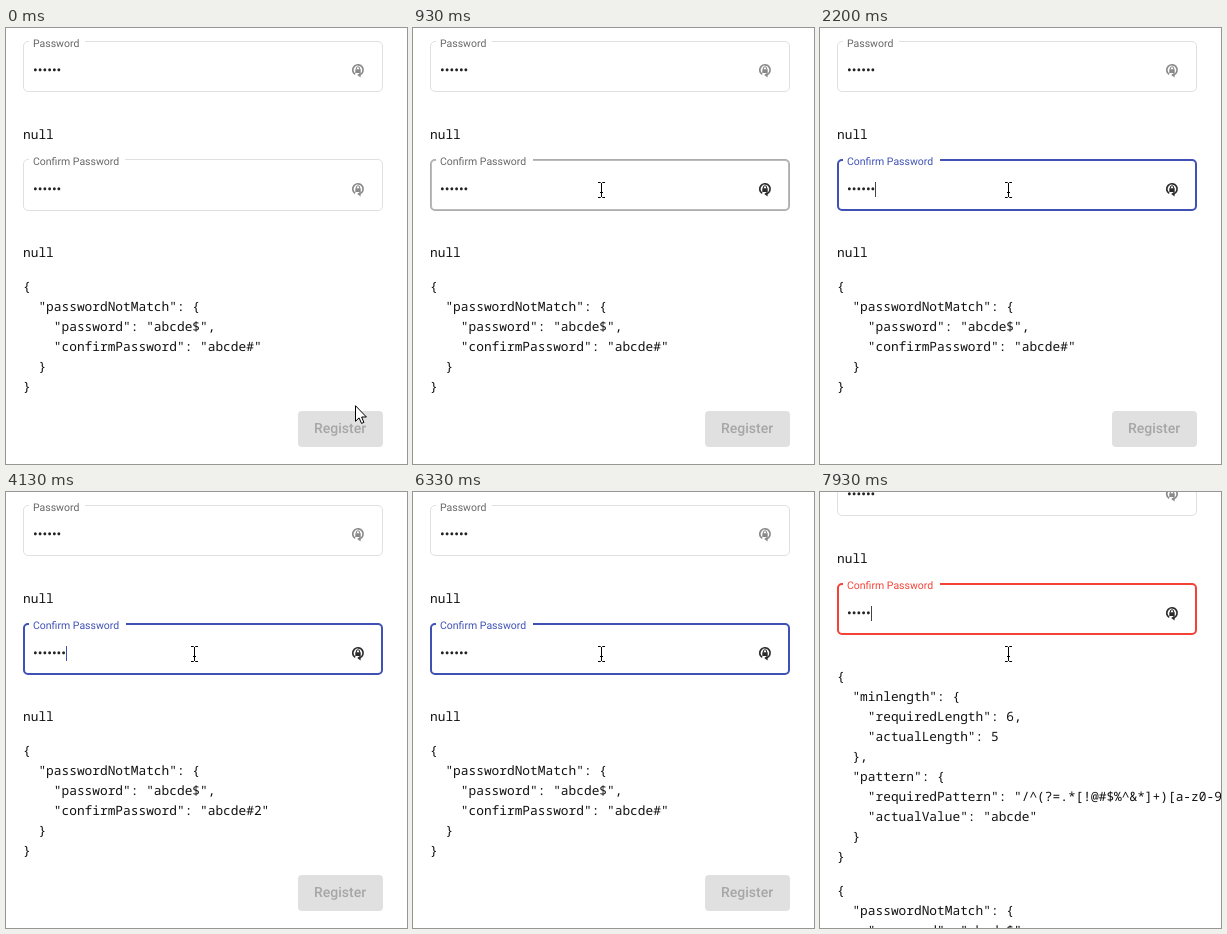
Animation, 401 px wide and 436 px high, one loop 8 s. Source, as an HTML page:

```html
<!DOCTYPE html>
<html lang="en">
<head>
<meta charset="utf-8">
<title>Password form</title>
<style>
html, body { margin: 0; width: 100%; height: 100%; overflow: hidden; background: #fff; }
svg { display: block; text-rendering: geometricPrecision; }
text { white-space: pre; font-family: Roboto, sans-serif; }
.code { font: 12.83px "Noto Sans Mono", monospace; fill: #111; }
.label { font-size: 10.5px; }
.dots { font-size: 14px; fill: #222; }
.button { font-size: 14px; font-weight: 500; fill: #a6a6a6; }
</style>
</head>
<body>
<svg id="stage" width="401" height="436" viewBox="0 0 401 436"></svg>
<script>
const LOOP = 8000, STEP = 1000 / 15;
const GREY = 'rgba(0,0,0,.6)', DARK = '#212121', BLUE = '#3f51b5', RED = '#f44336';
const HOVER = 930, FOCUS = 1330, INVALID = 6670;
const PATTERN = '/^(?=.*[!@#$%^&*]+)[a-z0-9!@#$%^&*]+$/';

// [time, number of characters in the confirm field]
const typing = [[0, 6], [3130, 7], [3800, 6], [4130, 7], [4400, 8], [4670, 9],
  [4730, 10], [5070, 9], [5400, 8], [5800, 7], [6200, 6], [INVALID, 5]];
const caretOn = [[FOCUS, 1670], [2200, 2730], [3130, 3670], [4130, 5270], [5800, 6330], [6870, LOOP]];

const stage = document.getElementById('stage');
const escapeText = s => s.replace(/&/g, '&amp;').replace(/</g, '&lt;');
const text = (cls, x, y, s, fill = '') =>
  `<text class="${cls}" x="${x}" y="${y}"${fill && ` fill="${fill}"`}>${escapeText(s)}</text>`;

function json(value, y) {
  return JSON.stringify(value, null, 2).split('\n')
    .map((line, i) => text('code', 17, y + 20 * i, line)).join('');
}

// Rounded outline from x = 17 to 377 with a gap for the label
function outline(top, bottom, gapEnd, width, color, opacity = 1) {
  const h = width / 2, r = 5 - h, l = 17 + h, e = 377 - h, t = top + h, b = bottom - h;
  const arc = (x, y) => `A${r} ${r} 0 0 1 ${x} ${y}`;
  return `<path fill="none" stroke="${color}" stroke-width="${width}" opacity="${opacity}" d="
    M${gapEnd} ${t}H${e - r}${arc(e, t + r)}V${b - r}${arc(e - r, b)}
    H${l + r}${arc(l, b - r)}V${t + r}${arc(l + r, t)}H23"/>`;
}

function lockIcon(y, color) {
  return `<g transform="translate(352 ${y})" fill="none" stroke="${color}">
    <path stroke-width="1.7" d="M-2.8 4.4A5.2 5.2 0 1 1 1.6 4.9"/>
    <path stroke="none" fill="${color}" d="M-2.7 -.8h5.4v3.9h-5.4zM2.6 2.6V7.4L-.8 5z"/>
    <path stroke-width="1.1" d="M-1.6 -.6V-1.6A1.6 1.6 0 0 1 1.6 -1.6V-.6"/></g>`;
}

function pointer(t) {
  if (t >= HOVER) {
    return `<path fill="none" stroke="#000" d="M185 154.5h2.5l1 1l1-1h2.5M188.5 155v14
      M185 169.5h2.5l1-1l1 1h2.5M187 164.5h3"/>`;
  }
  const s = Math.floor((t + 4) / STEP) * STEP;
  const x = 349 - .1491 * s - .0000426 * s * s;
  const y = 377 + .0278 * s - .0003015 * s * s;
  return `<path transform="translate(${Math.round(x)} ${Math.round(y)})" fill="#fff" stroke="#000"
    d="M.5 .7V16.3L4.1 12.9L6.5 18.4L8.9 17.4L6.6 12H11.4Z"/>`;
}

function confirmField(t, count) {
  const color = t >= INVALID ? RED : t >= FOCUS ? BLUE : DARK;
  const fade = Math.min(1, Math.max(0, (t - 870) / 200));
  const hovered = t >= HOVER;
  let out = outline(131, 183, hovered ? 120 : 119, 1, '#e0e0e0', 1 - fade);
  if (hovered) out += outline(131, 183, 120, 2, color, fade);
  out += text('label', 27, 137, 'Confirm Password', t >= FOCUS ? color : GREY);
  out += text('dots', 27, 166, '•'.repeat(count));
  out += lockIcon(161, hovered ? '#2b2b2b' : '#8a8a8a');
  if (caretOn.some(([from, to]) => t >= from && t < to)) {
    const x = Math.round(27 + 4.717 * count);
    out += `<rect x="${x}" y="154" width="1" height="15" fill="${count > 6 ? BLUE : '#444'}"/>`;
  }
  return out;
}

function scene(t) {
  const count = typing.filter(([at]) => t >= at).pop()[1];
  const value = 'abcde#2345'.slice(0, count);
  const invalid = t >= INVALID;
  const errors = invalid ? {
    minlength: { requiredLength: 6, actualLength: count },
    pattern: { requiredPattern: PATTERN, actualValue: value }
  } : null;
  const grow = invalid ? 214 : 34;
  return `<g transform="translate(0 ${invalid ? -40 : 0})">`
    + outline(13, 64, 79, 1, '#e0e0e0')
    + text('label', 27, 19, 'Password', GREY)
    + text('dots', 27, 47, '••••••')
    + lockIcon(42, '#8a8a8a')
    + json(null, 111)
    + confirmField(t, count)
    + json(errors, 229)
    + json({ passwordNotMatch: { password: 'abcde$', confirmPassword: value } }, 229 + grow)
    + `<rect x="292" y="${349 + grow}" width="85" height="36" rx="4" fill="#e0e0e0"/>`
    + text('button', 308, 371 + grow, 'Register')
    + '</g>' + pointer(t);
}

let shown = '';
function draw(now) {
  const next = scene(now % LOOP);
  if (next !== shown) stage.innerHTML = shown = next;
  requestAnimationFrame(draw);
}
draw(0);
</script>
</body>
</html>
```
